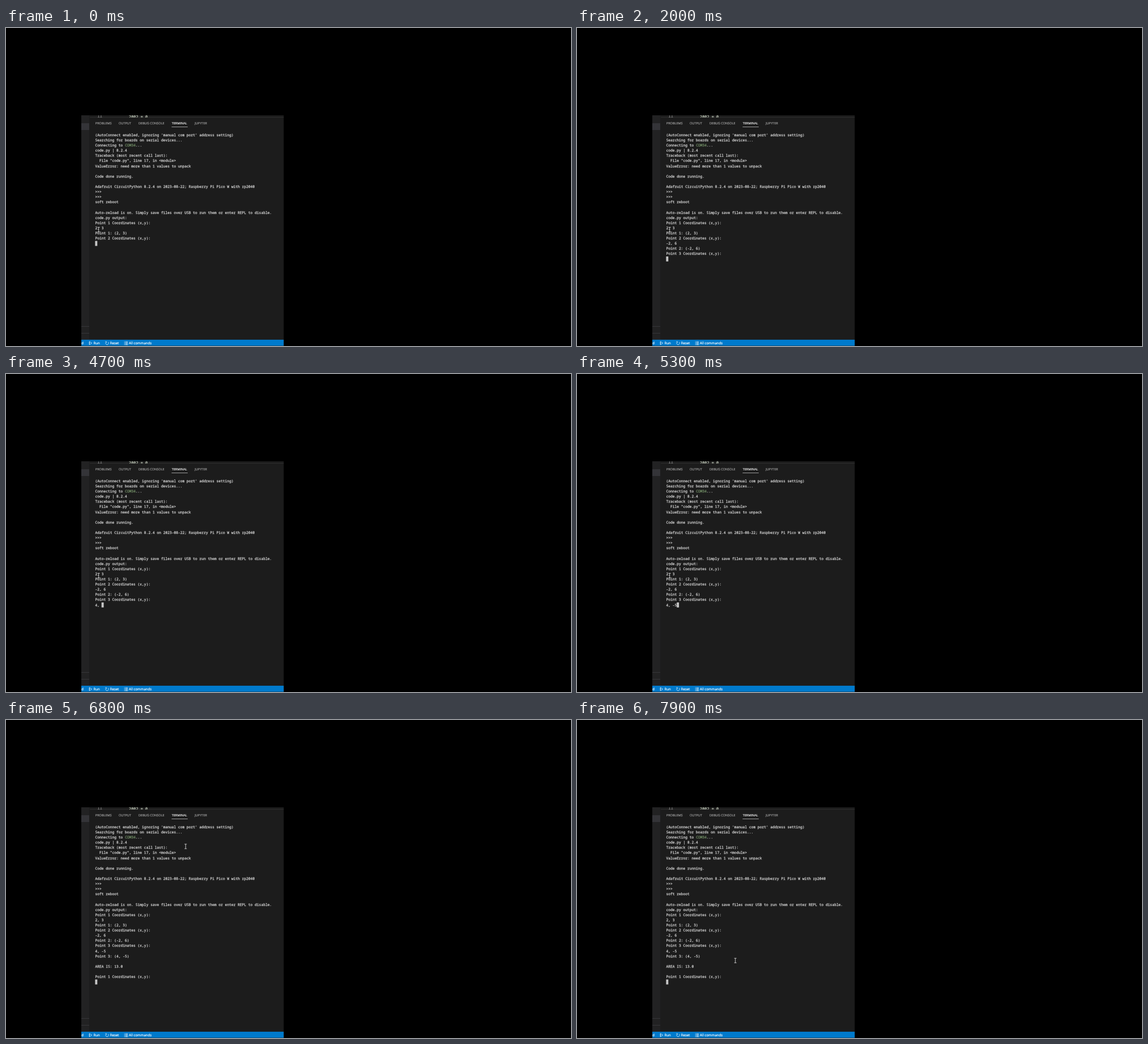
Recreate the animation shown at these times as an HTML page with a canvas. Size 998 px wide and 561 px high, loop 8000 ms.

```html
<!DOCTYPE html>
<html lang="en">
<head>
<meta charset="utf-8">
<title>Terminal session</title>
<style>
  html, body { margin: 0; width: 100%; height: 100%; overflow: hidden; background: #000; }
  canvas { display: block; }
</style>
</head>
<body>
<canvas id="stage" width="998" height="561"></canvas>
<script>
const ctx = document.getElementById('stage').getContext('2d', { alpha: false });
const LOOP = 8000;
const MONO = '6.28px "Noto Sans Mono", "DejaVu Sans Mono", monospace';
const CODE = '6.9px "Noto Sans Mono", "DejaVu Sans Mono", monospace';
const CHAR = 3.768, LINE = 9.117, LEFT = 157.4, FIRST_BASE = 190.8;

const history = [
  "(AutoConnect enabled, ignoring 'manual com port' address setting)",
  'Searching for boards on serial devices...',
  'Connecting to COM34...',
  'code.py | 8.2.4',
  'Traceback (most recent call last):',
  '  File "code.py", line 17, in <module>',
  'ValueError: need more than 1 values to unpack',
  '',
  'Code done running.',
  '',
  'Adafruit CircuitPython 8.2.4 on 2023-08-22; Raspberry Pi Pico W with rp2040',
  '>>>',
  '>>>',
  'soft reboot',
  '',
  'Auto-reload is on. Simply save files over USB to run them or enter REPL to disable.',
  'code.py output:',
  'Point 1 Coordinates (x,y):',
  '2, 3',
  'Point 1: (2, 3)',
  'Point 2 Coordinates (x,y):',
  ''
].join('\n');

// Keystrokes and program output: [time, appended text]
const typed = [
  [400, '-'], [700, '2'], [1000, ','], [1200, ' '], [1800, '6'],
  [2000, '\nPoint 2: (-2, 6)\nPoint 3 Coordinates (x,y):\n'],
  [4200, '4'], [4500, ','], [4700, ' '], [5000, '-'], [5200, '5'],
  [5600, '\nPoint 3: (4, -5)\n\nAREA IS: 13.0\n\nPoint 1 Coordinates (x,y):\n']
];

// Pointer stops: [time, x, y]
const pointerPath = [
  [0, 163.7, 355.5], [6300, 163.7, 355.5], [6700, 317.3, 223],
  [6900, 317.3, 223], [7500, 279.7, 424.3], [LOOP, 279.7, 424.3]
];

function rect(x, y, w, h, color) {
  ctx.fillStyle = color;
  ctx.fillRect(x, y, w, h);
}

// The thin outline gives small type its weight.
function text(str, x, y, color, font, outline = 0.2) {
  ctx.font = font;
  ctx.fillStyle = ctx.strokeStyle = color;
  ctx.lineWidth = outline;
  ctx.fillText(str, x, y);
  ctx.strokeText(str, x, y);
}

function line(points, color, width) {
  ctx.strokeStyle = color;
  ctx.lineWidth = width;
  ctx.beginPath();
  points.forEach(([x, y], i) => i ? ctx.lineTo(x, y) : ctx.moveTo(x, y));
  ctx.stroke();
}

function drawPanel() {
  rect(0, 0, 998, 561, '#000');
  rect(133, 154, 357.5, 407, '#1c1c1c');
  rect(133, 154, 14, 396, '#222223');
  rect(133, 168, 14, 12, '#343438');
  rect(133, 526, 14, 0.7, '#404042');
  rect(133, 538, 14, 0.7, '#404042');

  rect(148, 157, 342.5, 0.8, '#323232');
  ctx.save();
  ctx.beginPath();
  ctx.rect(148, 154, 342, 4);
  ctx.clip();
  text('2002 = 0', 217, 159, '#c0c8b8', CODE);
  text('ll', 161.5, 158, '#888', CODE);
  ctx.restore();
}

function drawTabs() {
  const font = '5.58px "Open Sans", "Noto Sans", sans-serif';
  const tabs = { PROBLEMS: 157.8, OUTPUT: 199, 'DEBUG CONSOLE': 234, TERMINAL: 292.8, JUPYTER: 333.3 };
  for (const [name, x] of Object.entries(tabs)) {
    text(name, x, 170.1, name === 'TERMINAL' ? '#e7e7e7' : '#999', font);
  }
  rect(292.5, 174.2, 28.5, 0.7, '#d0d0d0');
}

function drawStatusBar() {
  const font = '6.1px "Open Sans", "Noto Sans", sans-serif';
  const white = '#eef6fc';
  rect(133, 549.9, 357.5, 10.7, '#007acc');
  ctx.save();
  ctx.beginPath();
  ctx.rect(133, 549, 357, 12);
  ctx.clip();
  text('d', 133.3, 558.2, white, font);
  ctx.restore();
  text('Run', 154.5, 558.2, white, font);
  text('Reset', 183.8, 558.2, white, font);
  text('All commands', 217, 558.2, white, font);

  line([[147.3, 553.2], [147.3, 558.6], [151.8, 555.9], [147.3, 553.2], [147.3, 558.6]], white, 0.7);

  ctx.beginPath();
  ctx.arc(178.6, 556, 2.6, -0.9, 3.9);
  ctx.stroke();
  line([[175.4, 553.3], [177.4, 553.3], [177.4, 555.2]], white, 0.7);

  for (let i = 0; i < 4; i++) {
    const y = 553.3 + i * 1.7;
    rect(208.8, y, 1, 0.8, white);
    rect(210.6, y, 4.6, 0.8, white);
  }
}

function drawTerminal(t) {
  const output = typed.reduce((all, [at, str]) => t >= at ? all + str : all, history);
  const rows = output.split('\n');
  rows.forEach((row, i) => {
    const y = FIRST_BASE + i * LINE;
    let x = LEFT;
    for (const part of row.split(/(COM34)/)) {
      text(part, x, y, part === 'COM34' ? '#728f66' : '#d2d2d2', MONO, 0.25);
      x += part.length * CHAR;
    }
  });
  const last = rows.length - 1;
  rect(LEFT + rows[last].length * CHAR, FIRST_BASE + last * LINE - 6.6, 3.9, 8.8, '#c6c6c6');
}

function drawPointer(t) {
  const i = pointerPath.findIndex(([at]) => at > t);
  const [t0, x0, y0] = pointerPath[i - 1], [t1, x1, y1] = pointerPath[i];
  const u = (t - t0) / (t1 - t0), ease = u * u * (3 - 2 * u);
  const x = x0 + (x1 - x0) * ease, y = y0 + (y1 - y0) * ease;
  const color = '#d6d6d6';
  line([[x, y - 4], [x, y + 4]], color, 0.9);
  for (const dy of [-4, 4]) line([[x - 2, y + dy], [x + 2, y + dy]], color, 0.9);
}

function frame() {
  const t = Math.floor(performance.now() % LOOP / 100) * 100;
  ctx.textRendering = 'geometricPrecision';
  drawPanel();
  drawTabs();
  drawTerminal(t);
  drawStatusBar();
  drawPointer(t);
  requestAnimationFrame(frame);
}
frame();
</script>
</body>
</html>
```
